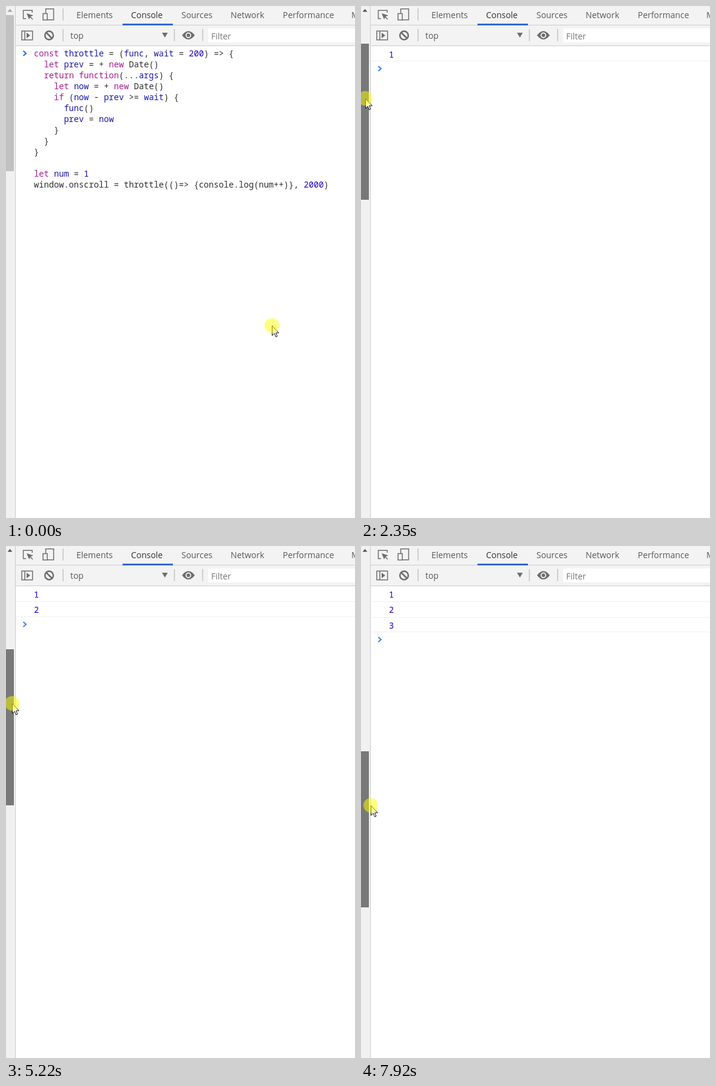
An HTML page for the animation above (8000 ms loop, 575x843 px).

```html
<!DOCTYPE html>
<html lang="en">
<head>
<meta charset="utf-8">
<style>
  html, body { margin: 0; height: 100%; overflow: hidden; background: #fff; }
  svg { display: block; }
  text { white-space: pre; }
  .ui { font: 13.95px "Open Sans", "Noto Sans", sans-serif; fill: #5a5a5a; }
  .code { font: 13.72px "Noto Sans Mono", "DejaVu Sans Mono", monospace; fill: #303030; }
  .key { fill: #a71d8f; }
  .var { fill: #1a1aa6; }
  .num { fill: #1c00cf; }
  .icon { fill: none; stroke: #6e6e6e; stroke-width: 1.5; }
  .solid { fill: #6e6e6e; }
  .prompt { fill: none; stroke: #3b7ff0; stroke-width: 2; }
</style>
</head>
<body>
<svg width="575" height="843" viewBox="0 0 575 843">
  <defs><path id="chevron" d="M28.5 -4L33 0L28.5 4"/></defs>

  <!-- page scrollbar -->
  <rect width="15" height="843" fill="#f1f1f1"/>
  <path id="arrow" d="M2.5 9.5L6.5 5L10.5 9.5Z"/>
  <rect id="thumb" width="13" height="257"/>

  <!-- toolbars -->
  <rect x="16" width="559" height="65" fill="#f3f3f3"/>
  <path d="M15.5 0V843M16 31.5H575M16 65.5H575" stroke="#ccc"/>
  <path d="M94 4V24M94 38V58M277.5 38V58M324 38V58" stroke="#c6c6c6" stroke-width="1.6"/>
  <rect x="192" y="29" width="83" height="3" fill="#3367d6"/>
  <rect x="333" y="37" width="242" height="23" fill="#fff"/>
  <g class="icon">
    <path d="M43.2 11V7.2H28.5V20.8H33M39 17L44 22" />
    <path d="M65.5 12V4.8H78.5V22.8H68"/>
    <rect x="61" y="12.5" width="7" height="10.5"/>
    <path d="M26 41.2H43.7V55.8H26ZM31 41V56"/>
    <circle cx="71" cy="48.5" r="6.9" stroke-width="2.5"/>
    <path d="M66 43.5L76 53.5" stroke-width="2.5"/>
  </g>
  <g class="solid">
    <path d="M34 12L45 15.5L40.5 17.5L38 22Z"/>
    <path d="M34 44V53L40 48.5Z"/>
    <path d="M257 44H266.5L261.8 52Z"/>
    <path d="M290 48.2Q300.5 34.5 311 48.2Q300.5 62 290 48.2Z"/>
    <circle cx="300.5" cy="48.2" r="3.8" stroke="#f3f3f3" stroke-width="1.8"/>
  </g>
  <g class="ui">
    <text x="116" y="20">Elements</text>
    <text x="206" y="20" fill="#333">Console</text>
    <text x="289" y="20">Sources</text>
    <text x="370" y="20">Network</text>
    <text x="456" y="20">Performance</text>
    <text x="569" y="20">Memory</text>
    <text x="106" y="54">top</text>
    <text x="338" y="55" fill="#757575">Filter</text>
  </g>

  <!-- console -->
  <g id="input" class="code"></g>
  <g id="result" class="code">
    <path d="M33 315L28.5 319L33 323M35 319H37" fill="none" stroke="#a0a0a0" stroke-width="1.5"/>
    <path d="M16 439.5H575" stroke="#f0f0f0"/>
  </g>
  <g id="logs" class="code"></g>
  <use id="prompt" class="prompt" href="#chevron"/>
  <use id="sent" class="prompt" href="#chevron" y="78" style="stroke:#9a9a9a"/>
  <rect id="caret" x="46" width="1" height="18"/>

  <g id="pointer">
    <path d="M.5 .5V16.5L4.2 13.2L6.7 18.9L9 17.9L6.6 12.2H11.4Z" fill="#fff" stroke="#111"/>
    <circle r="12" fill="#ff0" fill-opacity=".5"/>
  </g>
</svg>
<script>
const $ = id => document.getElementById(id);
const LOOP = 8000, STEP = 77;
const RUN = 320, CLEAR = 700, PRESS = 1430, SCROLL = 1810;
const LOG_TIMES = [2120, 3900, 5690];

const source = `const throttle = (func, wait = 200) => {
  let prev = + new Date()
  return function(...args) {
    let now = + new Date()
    if (now - prev >= wait) {
      func()
      prev = now
    }
  }
}

let num = 1
window.onscroll = throttle(()=> {console.log(num++)}, 2000)`.split('\n');

const tint = line => line.replace(/>/g, '&gt;').replace(
  /\b(const|let|return|function|new|if)\b|\b(\d+)\b|\b(?:func|wait|prev|now|args)\b|(?<=const |let )\w+/g,
  (word, key, num) => `<tspan class="${key ? 'key' : num ? 'num' : 'var'}">${word}</tspan>`);

const textRow = (html, y) => `<text x="46" y="${y}">${html}</text>`;

$('input').innerHTML = source.map((line, i) => textRow(tint(line), 83 + 18 * i)).join('');
$('result').innerHTML +=
  ['<tspan class="var" font-style="italic">ƒ</tspan> (...args) {', ...source.slice(3, 9)]
    .map((line, i) => textRow(i ? line.replace(/>/g, '&gt;') : line, 324 + 18 * i)).join('');

// Pointer moves: start time, steps, then the pointer x, y and thumb top reached
const moves = [
  [700, 8, 7, 104, 15],
  [1810, 5, 7, 162, 71],
  [2200, 3, 7, 147, 58],
  [2500, 5, 5, 244, 155],
  [3040, 3, 1, 361, 263],
  [3280, 2, 1, 376, 287],
  [3590, 7, 4, 481, 392],
  [4290, 2, 5, 403, 323],
  [4450, 2, 9, 371, 282],
  [4750, 3, 10, 282, 193],
  [5150, 4, 10, 190, 101],
  [5610, 4, 10, 105, 16],
  [6080, 1, 10, 192, 90],
  [6160, 3, 12, 262, 173],
  [6540, 3, 10, 466, 377],
  [6920, 1, 10, 475, 385],
  [7000, 4, 10, 555, 466],
  [7540, 3, 16, 428, 339],
  [7920, 1, 16, 427, 338]
];

function pose(t) {
  let now = [438, 526, 15];
  for (const [start, steps, ...goal] of moves) {
    if (t < start) break;
    const part = Math.min(1, (1 + Math.floor((t - start) / STEP)) / steps);
    now = now.map((v, i) => v + (goal[i] - v) * part);
  }
  return now.map(Math.round);
}

function logRows(count) {
  let html = '';
  for (let i = 0; i < count; i++) {
    const last = i === count - 1;
    const rule = Math.floor(65 + 25.5 * (i + 1)) + (last ? .5 : 1.5);
    html += `<text class="num" x="46" y="${Math.round(85 + 25.4 * i)}">${i + 1}</text>` +
      `<path d="M16 ${rule}H575" stroke="#f0f0f0"/>`;
  }
  return html;
}

const show = (id, on) => $(id).style.display = on ? '' : 'none';
let shown = -1;

function draw(t) {
  const [x, y, top] = pose(t);
  const ran = t >= RUN && t < CLEAR;
  const count = LOG_TIMES.filter(at => t >= at).length;

  $('pointer').setAttribute('transform', `translate(${x} ${y})`);
  $('thumb').setAttribute('y', top);
  $('thumb').setAttribute('fill', t >= PRESS ? '#787878' : x < 13 ? '#a8a8a8' : '#c1c1c1');
  $('arrow').setAttribute('fill', t >= SCROLL ? '#505050' : '#a3a3a3');

  show('input', t < CLEAR);
  show('result', ran);
  show('sent', ran);
  show('caret', t >= 170 && t < CLEAR);
  $('caret').setAttribute('y', ran ? 443 : 303);
  $('prompt').setAttribute('y', ran ? 452 : Math.round(78 + 25.4 * count));
  $('prompt').style.stroke = t < RUN ? '#2a68d8' : '';

  if (count !== shown) $('logs').innerHTML = logRows(shown = count);
}

const begin = performance.now();
function frame() {
  draw((performance.now() - begin) % LOOP);
  requestAnimationFrame(frame);
}
frame();
</script>
</body>
</html>
```
